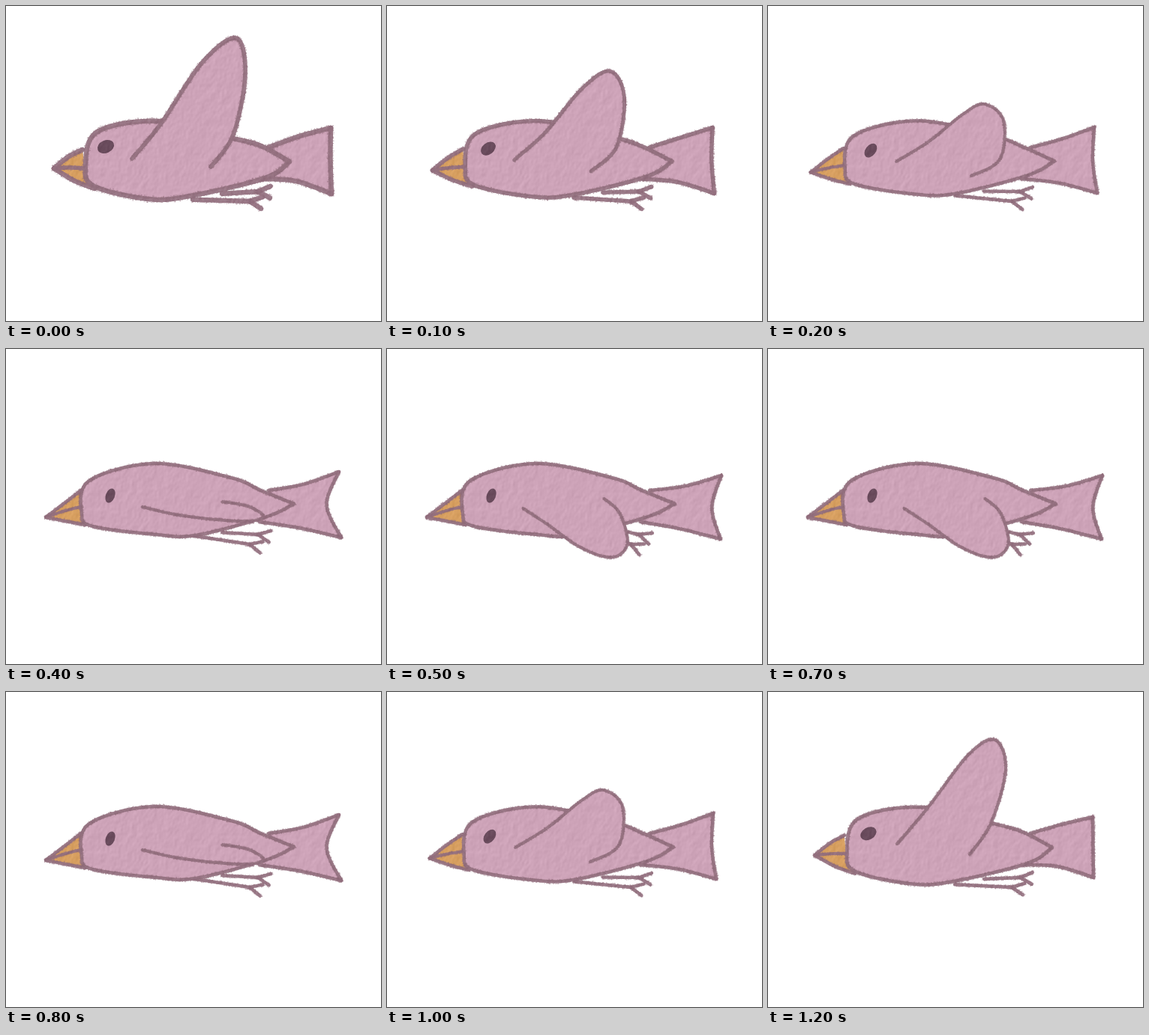
Recreate the animation shown at these times as an HTML page with a canvas. Size 500x421 px, loop 1300 ms.

```html
<!DOCTYPE html>
<html lang="en">
<head>
<meta charset="utf-8">
<title>Flying bird</title>
<style>
html, body { margin: 0; width: 100%; height: 100%; overflow: hidden; background: #fff; }
canvas { display: block; }
</style>
</head>
<body>
<canvas id="stage" width="500" height="421"></canvas>
<script>
const W = 500, H = 421, STEP = 100;
const PINK = '#cda3b8', LINE = '#93707f', BEAK = '#d79f60', EYE = '#694b5c';

// Body and beak (tip, brow, mouth, chin) blend from upright to gliding.
const BODY = [
  [378,208, 345,230, 245,254, 190,258, 118,241, 106,214, 122,168, 205,154, 303,177, 340,187, 378,208],
  [384,207, 345,225, 253,249, 200,248, 116,237, 101,220, 111,176, 198,153, 300,172, 340,189, 384,207]
];
const BEAKS = [[64,217, 102,192, 105,217, 118,244], [53,225, 100,189, 99,211, 105,235]];

// Pose: glide 0..1, pen width, leg tilt, wing outline, tail (top corner, bottom corner, notch)
const high = [0, 8, -.02, [168,204, 206,158, 262,75, 307,43, 319,92, 303,172, 273,215], [433,163, 434,251, 1]];
const raised = [.15, 5.6, 0, [172,203, 212,156, 268,83, 303,64, 317,103, 298,174, 269,217], [433,167, 434,248, 0]];
const half = [.65, 5.4, .05, [171,208, 216,180, 258,146, 288,131, 314,153, 309,205, 271,227], [435,162, 439,250, 4]];
const flat = [1, 5.4, .1, [182,211, 225,221, 280,228, 325,230, 343,223, 322,210, 289,204], [444,164, 447,252, 18]];
const low = [1, 5.4, .45, [181,215, 203,248, 237,303, 274,327, 298,298, 299,230, 290,196], [448,174, 442,256, 6]];

const mix = (a, b, t) => Array.isArray(a) ? a.map((v, i) => mix(v, b[i], t)) : a + (b - a) * t;

function seeded(s) {
  return () => {
    s = (s + 0x6D2B79F5) | 0;
    let t = Math.imul(s ^ (s >>> 15), 1 | s);
    t = (t + Math.imul(t ^ (t >>> 7), 61 | t)) ^ t;
    return ((t ^ (t >>> 14)) >>> 0) / 4294967296;
  };
}

// Catmull-Rom curve through the points, sampled about once per pixel
function curve(list) {
  const p = [];
  for (let i = 0; i < list.length; i += 2) p.push([list[i], list[i + 1]]);
  const out = [];
  for (let i = 0; i < p.length - 1; i++) {
    const a = p[Math.max(i - 1, 0)], b = p[i], c = p[i + 1], d = p[Math.min(i + 2, p.length - 1)];
    const n = Math.ceil(Math.hypot(c[0] - b[0], c[1] - b[1])) || 1;
    for (let j = 0; j < n; j++) {
      const t = j / n;
      out.push([0, 1].map(k => b[k] + t / 2 * (c[k] - a[k]
        + t * (2 * a[k] - 5 * b[k] + 4 * c[k] - d[k]
        + t * (3 * (b[k] - c[k]) + d[k] - a[k])))));
    }
  }
  out.push(p[p.length - 1]);
  return out;
}

// Curve from a to b whose middle is shifted by dx, dy
const bow = ([ax, ay], [bx, by], dx, dy) => curve([ax, ay, (ax + bx) / 2 + dx, (ay + by) / 2 + dy, bx, by]);

function trace(g, pts) {
  g.beginPath();
  pts.forEach(q => g.lineTo(q[0], q[1]));
}

function fill(g, pts, color) {
  trace(g, pts);
  g.fillStyle = color;
  g.fill();
}

// Solid core with a crumbly chalk rim
function chalk(g, pts, width, rnd) {
  g.strokeStyle = g.fillStyle = LINE;
  g.lineCap = g.lineJoin = 'round';
  g.lineWidth = width * .8;
  g.globalAlpha = .92;
  trace(g, pts);
  g.stroke();
  g.globalAlpha = .42;
  for (const [x, y] of pts) {
    for (let k = 0; k < 4; k++) {
      const a = rnd() * 2 * Math.PI, r = width * (.3 + .28 * rnd());
      g.beginPath();
      g.arc(x + r * Math.cos(a), y + r * Math.sin(a), .4 + .6 * rnd(), 0, 7);
      g.fill();
    }
  }
  g.globalAlpha = 1;
}

function noise(cw, ch, seed) {
  const cols = Math.ceil(W / cw) + 3, rnd = seeded(seed);
  const grid = Array.from({ length: cols * (Math.ceil(H / ch) + 3) }, rnd);
  const ease = t => t * t * (3 - 2 * t);
  return (x, y) => {
    x /= cw; y /= ch;
    const i = Math.floor(x), j = Math.floor(y), u = ease(x - i), v = ease(y - j), o = j * cols + i;
    return mix(mix(grid[o], grid[o + 1], u), mix(grid[o + cols], grid[o + cols + 1], u), v);
  };
}

// Embossed paper grain
const fine = noise(3, 4, 5), coarse = noise(7, 10, 8);
const height = (x, y) => fine(x, y) * 14 + coarse(x, y) * 22;
const grain = new Float32Array(W * H);
for (let y = 0; y < H; y++)
  for (let x = 0; x < W; x++)
    grain[y * W + x] = height(x + 1, y + 1) - height(x, y);

function addGrain(g) {
  const img = g.getImageData(0, 0, W, H), d = img.data;
  for (let i = 0; i < grain.length; i++) {
    if (!d[i * 4 + 3]) continue;
    for (let k = 0; k < 3; k++) d[i * 4 + k] += grain[i];
  }
  g.putImageData(img, 0, 0);
}

function render([glide, pen, tilt, wing, tail], index) {
  const c = document.createElement('canvas');
  c.width = W;
  c.height = H;
  const g = c.getContext('2d'), rnd = seeded(40 + index);
  const draw = (pts, w = pen) => chalk(g, pts, w, rnd);
  const shape = (list, w) => {
    const pts = curve(list);
    fill(g, pts, PINK);
    draw(pts, w);
  };

  const [tx, ty, bx, by, notch] = tail, top = [tx, ty], bottom = [bx, by];
  const edges = [
    bow([350, 189], top, 0, mix(-2, 4, glide)),
    bow(top, bottom, -notch, 0),
    bow(bottom, [338, 231], 0, mix(-7, -2, glide))
  ];
  fill(g, edges.flat(), PINK);
  edges.forEach(e => draw(e));

  // Each leg runs back from its ankle; two toes spread ahead of it.
  const leg = (x, y, length, angle) => {
    const ray = (a, r) => draw(curve([x, y, x + r * Math.cos(a), y + r * Math.sin(a)]));
    ray(angle, -length);
    ray(angle - .35, 18);
    ray(angle + .55, 18);
  };
  leg(336, 248, 48, tilt - .04);
  leg(325, 261, 76, tilt + .05);

  const b = mix(...BEAKS, glide);
  const [tip, brow, mouth, chin] = [0, 2, 4, 6].map(i => b.slice(i, i + 2));
  const bulge = 3 * (1 - glide);
  const upper = bow(tip, brow, 0, -bulge), lower = bow(chin, tip, 0, bulge);
  fill(g, [...upper, mouth, ...lower], BEAK);
  shape(mix(...BODY, glide));
  draw(upper);
  draw(lower);
  draw(bow(tip, mouth, 0, -1), pen * .85);

  shape(wing, pen * .87);

  g.fillStyle = EYE;
  g.beginPath();
  g.ellipse(mix(133, 139, glide), mix(188, 196, glide), mix(11.5, 10, glide), mix(8.5, 6, glide), mix(-.4, -1.2, glide), 0, 7);
  g.fill();

  addGrain(g);
  return c;
}

const cels = [high, mix(high, half, .5), half, mix(half, flat, .5), flat, mix(flat, low, .5), low, raised].map(render);
const order = [0, 1, 2, 3, 4, 5, 6, 5, 4, 3, 2, 1, 7];
const ctx = document.getElementById('stage').getContext('2d');
const start = performance.now();

function show(now) {
  const step = Math.floor(Math.max(0, now - start) / STEP) % order.length;
  ctx.fillStyle = '#fff';
  ctx.fillRect(0, 0, W, H);
  ctx.drawImage(cels[order[step]], 0, 0);
  requestAnimationFrame(show);
}
show(start);
</script>
</body>
</html>
```
